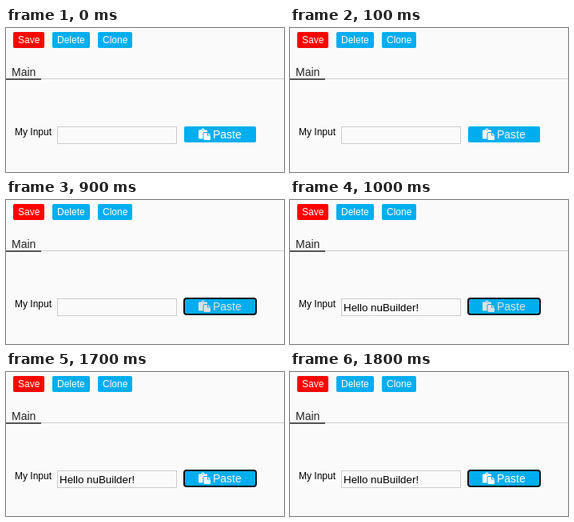
Write an HTML page that moves like this. It is 348 px wide and 180 px high and loops after 2.9 s.

```html
<!DOCTYPE html>
<html lang="en">
<head>
<meta charset="utf-8">
<title>Paste button</title>
<style>
  html, body { margin: 0; width: 100%; height: 100%; overflow: hidden; background: #fafafa; }
  svg { display: block; font: 12px Arial, "Liberation Sans", sans-serif; }
  .blue { fill: #00aeef; }
  .light { fill: #fff; }
</style>
</head>
<body>
<svg width="348" height="180" viewBox="0 0 348 180">
  <rect width="348" height="180" fill="#fafafa"/>

  <rect x="9" y="5" width="39" height="20" rx="2" fill="#f00"/>
  <rect class="blue" x="58" y="5" width="47" height="20" rx="2"/>
  <rect class="blue" x="115" y="5" width="43" height="20" rx="2"/>
  <g class="light">
    <text x="15" y="19">Save</text>
    <text x="64" y="19">Delete</text>
    <text x="121" y="19">Clone</text>
  </g>

  <rect y="63" width="348" height="1" fill="#ccc"/>
  <rect y="63" width="44" height="2" fill="#555"/>
  <text x="7" y="60" font-size="14" fill="#222">Main</text>

  <text x="11" y="134">My Input</text>
  <rect x="64.5" y="123.5" width="149" height="21" fill="#fafafa" stroke="#ccc"/>
  <text id="value" x="67" y="139" font-size="13.333">Hello nuBuilder!</text>

  <rect class="blue" x="223" y="123" width="90" height="20" rx="2"/>
  <rect id="ring" x="223" y="123" width="90" height="20" rx="3" fill="none" stroke="#101010" stroke-width="2"/>
  <g id="label">
    <path d="M242 127.5h2.5a2 2 0 0 1 4 0H251a1 1 0 0 1 1 1v1.5h-3.5a2 2 0 0 0-2 2v6.500H242a1 1 0 0 1-1-1v-9a1 1 0 0 1 1-1z"/>
    <path d="M248.500 131H252v3.500h4v4.500a1 1 0 0 1-1 1h-6.500a1 1 0 0 1-1-1v-7a1 1 0 0 1 1-1zM253 131l3 2.700h-3z"/>
    <circle class="blue" cx="246.500" cy="127.500" r=".8"/>
    <text x="259" y="138" font-size="14">Paste</text>
  </g>
</svg>
<script>
  const LOOP = 2900;
  const [value, ring, label] = ["value", "ring", "label"].map(id => document.getElementById(id));
  const show = (el, on) => el.setAttribute("visibility", on ? "visible" : "hidden");

  // Hover dims the button label, in one intermediate step each way
  function hoverAt(t) {
    if (t < 100 || t >= 1800) return 0;
    return t < 200 || t >= 1700 ? 0.3 : 1;
  }

  function draw(now) {
    const t = now % LOOP;
    const shade = 255 - 30 * hoverAt(t);
    label.setAttribute("fill", `rgb(${shade},${shade},${shade})`);
    show(ring, t >= 900);
    show(value, t >= 1000);
  }

  function frame() {
    draw(performance.now());
    requestAnimationFrame(frame);
  }
  frame();
</script>
</body>
</html>
```
